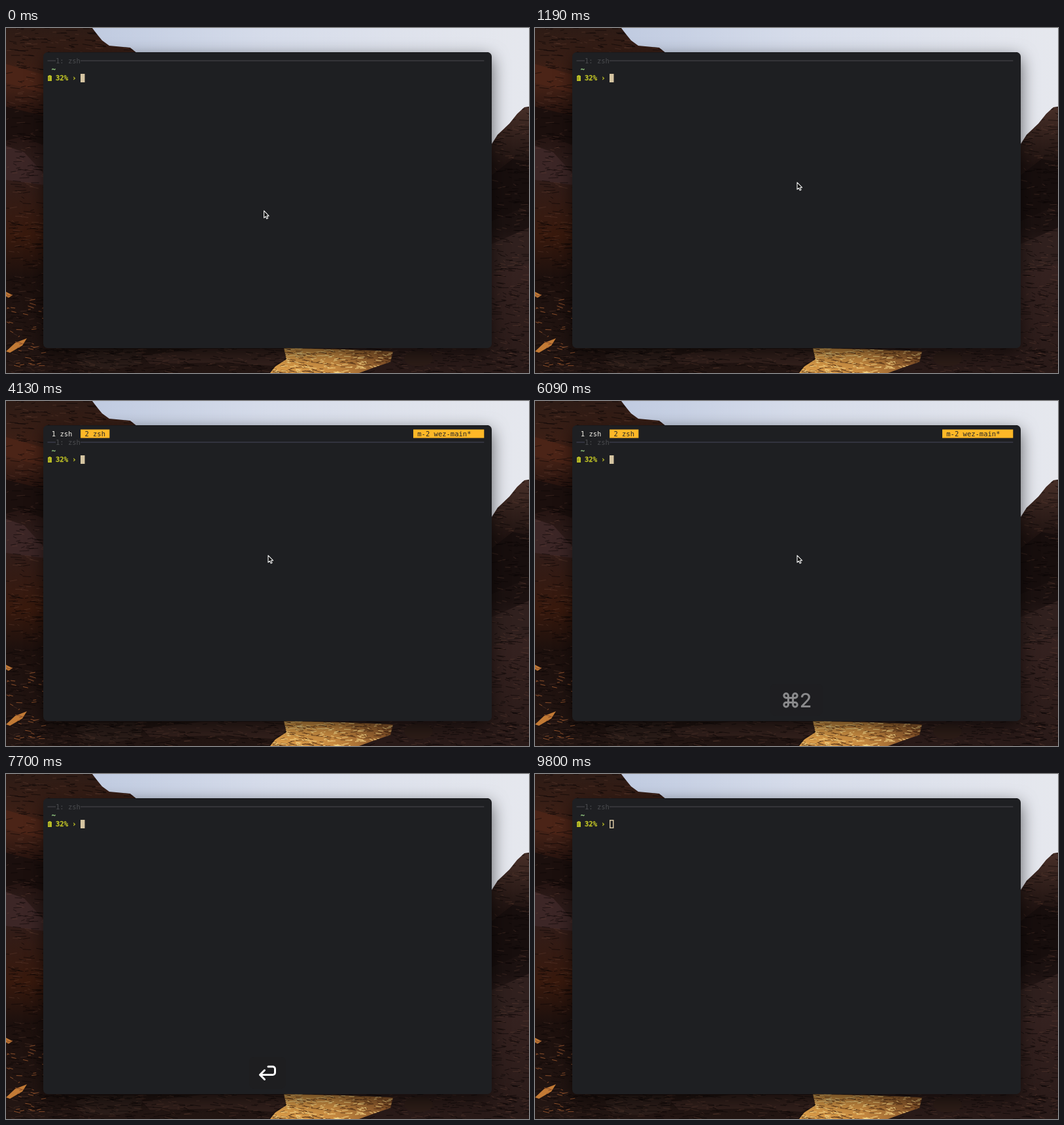
Animation, 800 px wide and 527 px high, one loop 9870 ms. Source, as an HTML page:

```html
<!DOCTYPE html>
<html lang="en">
<head>
<meta charset="utf-8">
<title>Terminal tabs</title>
<style>
  html, body { margin: 0; width: 100%; height: 100%; overflow: hidden; background: #1e1f22; }
  svg { display: block; width: 800px; height: 527px; }
  .window { filter: drop-shadow(0 8px 13px rgba(0, 0, 0, .6)); }
  .term { font: 10.5px "DejaVu Sans Mono", monospace; white-space: pre; }
  .bold { font-weight: bold; stroke-width: .3; }
  .keys { font: 500 30px Inter, sans-serif; fill: #fff; }
  .stroke { fill: none; stroke: #fff; stroke-width: 3; stroke-linecap: round; stroke-linejoin: round; }
</style>
</head>
<body>
<svg viewBox="0 0 800 527">
  <defs>
    <linearGradient id="sky">
      <stop offset=".15" stop-color="#bfcae0"/>
      <stop offset=".5" stop-color="#d6dcea"/>
      <stop offset="1" stop-color="#e6e8ee"/>
    </linearGradient>
    <linearGradient id="leftRock" x2="0" y2="1">
      <stop offset="0" stop-color="#2d1b15"/>
      <stop offset=".17" stop-color="#432116"/>
      <stop offset=".27" stop-color="#20100d"/>
      <stop offset=".4" stop-color="#2f1d1b"/>
      <stop offset=".6" stop-color="#38190d"/>
      <stop offset=".72" stop-color="#1d100d"/>
      <stop offset="1" stop-color="#231613"/>
    </linearGradient>
    <linearGradient id="rightRock" x2="0" y2="1">
      <stop offset="0" stop-color="#472f28"/>
      <stop offset=".22" stop-color="#1e1210"/>
      <stop offset=".45" stop-color="#1b1110"/>
      <stop offset=".6" stop-color="#352220"/>
      <stop offset="1" stop-color="#291a18"/>
    </linearGradient>
    <linearGradient id="gold">
      <stop offset="0" stop-color="#dfa14c"/>
      <stop offset=".5" stop-color="#c98c42"/>
      <stop offset="1" stop-color="#7c4b26"/>
    </linearGradient>
    <clipPath id="rocks">
      <path d="M0 0H132L138 8 147 19 158 27 190 30 200 38V480H743V177L752 163 770 146 782 131 793 121 800 120V527H0Z"/>
    </clipPath>
    <clipPath id="goldShape">
      <path d="M425 489L520 491 592 494 588 510 562 519 540 527H404L412 517 429 506Z"/>
    </clipPath>
  </defs>

  <rect width="800" height="527" fill="url(#sky)"/>
  <g clip-path="url(#rocks)">
    <rect width="430" height="527" fill="url(#leftRock)"/>
    <rect x="430" y="120" width="370" height="407" fill="url(#rightRock)"/>
    <path d="M0 55L60 72V100L0 84Z" fill="#4b2417"/>
    <path d="M0 180L28 190 60 225V240L0 232Z" fill="#3c2626"/>
    <path d="M0 120L60 135V180L24 166 0 172Z" fill="#1b0f0d"/>
    <path d="M743 225L775 200 800 205V270L743 295Z" fill="#170e0d"/>
    <path d="M743 330L800 305V360L743 375Z" fill="#30201e"/>
    <path d="M107 500L128 491H195L208 497 206 513 170 521 118 520Z" fill="#2b1d19"/>
    <path d="M208 500L300 490H425L429 505 408 516 330 511 220 513Z" fill="#32201c"/>
    <path id="streaksDark" fill="none" stroke="#0a0505" opacity=".6"/>
    <path id="streaksLight" fill="none" stroke="#7a5140" opacity=".3"/>
    <g clip-path="url(#goldShape)" fill="none">
      <rect x="400" y="489" width="200" height="38" fill="url(#gold)"/>
      <path id="goldDark" stroke="#4a2a14" opacity=".7"/>
      <path id="goldLight" stroke="#f8d584"/>
    </g>
    <ellipse cx="631" cy="505" rx="22" ry="12" fill="#2d1d18"/>
    <path d="M0 494L14 481 32 474 25 485 6 496ZM0 403L10 408 4 412 0 410Z" fill="#c27a35"/>
    <path id="glints" fill="none" stroke="#8a4e2a"/>
  </g>

  <rect class="window" x="57" y="37" width="686" height="452" rx="6.5" fill="#1e1f22"/>
  <path d="M62 37.5H738" stroke="#191a1d"/>

  <g class="term">
    <g id="tabBar">
      <rect id="activeTab" y="43.5" width="44.3" height="13" fill="#feb827"/>
      <text id="tab1" x="69.8" y="54">1 zsh</text>
      <text id="tab2" x="120.4" y="54">2 zsh</text>
      <rect x="623" y="43.5" width="108.3" height="13" fill="#feb827"/>
      <text x="629.3" y="54" fill="#282828">m-2 wez-main*</text>
    </g>
    <g id="pane">
      <path id="rule" d="M63.5 50H76M114 50H731.3"/>
      <text x="76" y="54" fill="#4a4b4e">1: zsh</text>
      <text class="bold" x="69.8" y="67" fill="#8ec07c" stroke="#8ec07c">~</text>
      <path d="M65.5 72H68.5V73H70V81H64V73H65.5Z" fill="#b8bb26"/>
      <path d="M66 75V79" stroke="#7d801f"/>
      <text class="bold" x="76" y="80" fill="#b8bb26" stroke="#b8bb26">32% ›</text>
      <text id="typed" x="114" y="80" fill="#d5c4a1"></text>
      <rect id="cursor" stroke="#d5c4a1"/>
    </g>
  </g>

  <g id="overlay">
    <rect id="bezel" y="432" height="49" rx="8" fill="#1e1e20"/>
    <path id="command" class="stroke" d="M-3.6 3.6V-6.9a3.3 3.3 0 1 0-3.3 3.3H6.9a3.3 3.3 0 1 0-3.3-3.3V6.9a3.3 3.3 0 1 0 3.3-3.3H-6.9a3.3 3.3 0 1 0 3.3 3.3Z"/>
    <text id="letter" class="keys" x="414" y="468" text-anchor="middle"></text>
    <path id="enter" class="stroke" d="M401 447H408a3.5 3.5 0 0 1 3.5 3.5V456a3.5 3.5 0 0 1-3.5 3.5H388.5M395.5 452.5L388.5 459.5 395.5 466.5"/>
  </g>

  <path id="pointer" d="M0 0V10.8L2.5 8.6 4.2 12.2 6 11.4 4.4 7.9H7.6Z" fill="#111" stroke="#f4f4f4" stroke-width="1.1" stroke-linejoin="round"/>
</svg>

<script>
const LOOP = 9870, STEP = 70, CELL = 6.33;
const OPEN = 2940, CLOSE = 7630, TYPING = 6440, BLUR = 9590;

// Key presses: [time, key, fade-in ms, fade-out start]
const presses = [
  [2170, "⌘", 280], [OPEN, "⌘T", 0, 3920],
  [4270, "⌘", 280], [4690, "⌘1", 0],
  [5110, "⌘2", 0, 6090], [CLOSE, "↵", 0, 8610]
];
const keyTimes = [TYPING, 6580, 6790, 7000];

// Rock areas: [x, y, width, height]
const left = [0, 0, 200, 527], right = [743, 120, 57, 407];
const floor = [0, 489, 800, 38], ledge = [0, 400, 57, 127], sand = [400, 489, 200, 38];

const el = {};
for (const node of document.querySelectorAll("[id]")) el[node.id] = node;
const set = (node, attrs) => {
  for (const name in attrs) node.setAttribute(name, attrs[name]);
};
const show = (node, on) => set(node, { visibility: on ? "inherit" : "hidden" });
const clamp = v => Math.max(0, Math.min(1, v));

let seed = 7;
const random = () => (seed = seed * 16807 % 2147483647) / 2147483647;

function streaks([x, y, w, h], count, length) {
  let d = "";
  for (let i = 0; i < count; i++) {
    const start = [x + random() * w, y + random() * h];
    const run = [length * (.3 + random()), random() * 5 - 2];
    d += `M${start.map(v => v.toFixed(1))}l${run.map(v => v.toFixed(1))}`;
  }
  return d;
}

function drawRocks() {
  set(el.streaksDark, { d: streaks(left, 900, 14) + streaks(right, 230, 12) + streaks(floor, 260, 14) });
  set(el.streaksLight, { d: streaks(left, 400, 10) + streaks(right, 110, 9) + streaks(floor, 160, 10) });
  set(el.goldDark, { d: streaks(sand, 170, 10) });
  set(el.goldLight, { d: streaks(sand, 150, 8) });
  set(el.glints, { d: streaks(ledge, 40, 8) });
}

function drawPane(t) {
  const tabs = t >= OPEN && t < CLOSE;
  const second = t < 4690 || t >= 5110;
  show(el.tabBar, tabs);
  set(el.activeTab, { x: second ? 114.1 : 63.5 });
  set(el.tab1, { fill: second ? "#f2f0e8" : "#282828" });
  set(el.tab2, { fill: second ? "#282828" : "#f2f0e8" });
  set(el.pane, { transform: `translate(0 ${tabs ? 13 : 0})` });
  set(el.rule, { stroke: tabs ? "#47475a" : "#4a4b4e" });

  const count = t < CLOSE ? keyTimes.filter(time => t >= time).length : 0;
  el.typed.textContent = "exit".slice(0, count);
  const hollow = t >= BLUR;
  const inset = hollow ? .75 : .5;
  set(el.cursor, {
    x: 114 + count * CELL + inset, y: 70 + inset,
    width: 6.5 - 2 * inset, height: 13 - 2 * inset,
    fill: hollow ? "none" : "#d5c4a1", "stroke-width": hollow ? 1.5 : 1
  });
}

function drawKeys(t) {
  const press = presses.findLast(p => t >= p[0]);
  show(el.overlay, press);
  if (!press) return;
  const [start, key, fadeIn, fadeStart = Infinity] = press;
  const rise = fadeIn ? clamp((t - start + STEP) / fadeIn) : 1;
  const fall = t < fadeStart ? 1 : clamp(1 - (t - fadeStart + STEP) / 280) ** 2 * .85;
  const pair = key.length > 1;
  set(el.overlay, { opacity: rise * fall });
  set(el.bezel, { x: pair ? 360 : 372, width: pair ? 80 : 56 });
  set(el.command, { transform: `translate(${pair ? 391 : 399.5} 457)` });
  show(el.command, key[0] === "⌘");
  show(el.enter, key === "↵");
  el.letter.textContent = key.slice(1);
}

function drawPointer(t) {
  const p = clamp(t / 1050);
  const ease = p * p * (3 - 2 * p);
  set(el.pointer, { transform: `translate(${394.6 + 6.4 * ease} ${279.2 - 43.4 * ease})` });
  show(el.pointer, t < TYPING);
}

function frame(now) {
  const t = Math.floor(now % LOOP / STEP) * STEP;
  drawPane(t);
  drawKeys(t);
  drawPointer(t);
  requestAnimationFrame(frame);
}

drawRocks();
frame(0);
</script>
</body>
</html>
```
